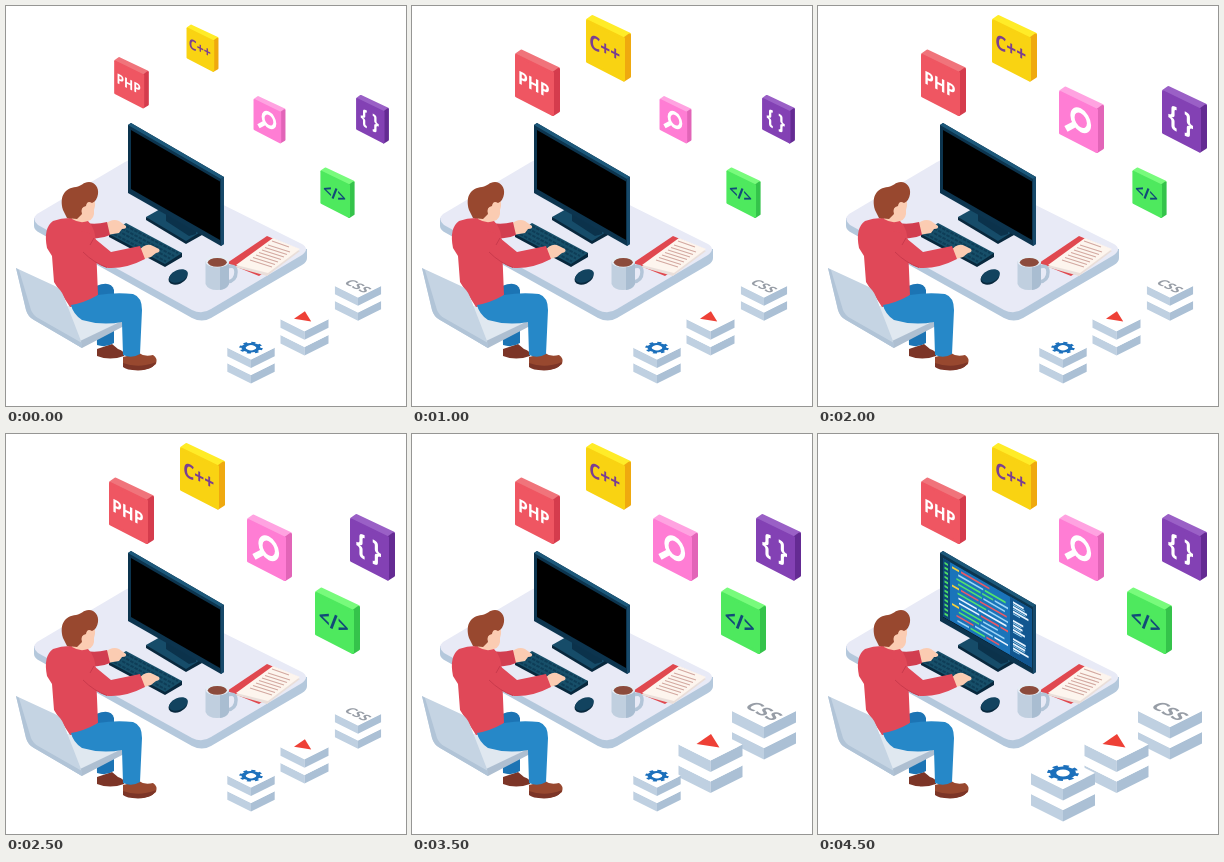
An HTML page that plays this animation: 400 px wide and 400 px high, repeating every 5 s.

```html
<!DOCTYPE html>
<html lang="en">
<head>
<meta charset="utf-8">
<title>Programmer at a desk</title>
<style>
  html, body { margin: 0; width: 100%; height: 100%; overflow: hidden; background: #fff; }
  svg { display: block; width: 100%; height: 100%; }
  text { font-family: "Open Sans", sans-serif; font-weight: 700; text-anchor: middle; }
</style>
</head>
<body>
<svg viewBox="0 0 400 400">
  <g id="desk">
    <path fill="#b4c8dc" d="M28 212V220Q28 224 34 227L186 312Q196 317 205 312L296 259Q301 256 301 252V243Z"/>
    <path fill="#e8eaf6" d="M31 208L119 156Q125 152 131 156L296 238Q304 243 296 249L205 303Q196 309 186 304L32 219Q25 213 31 208Z"/>
  </g>

  <g id="monitor">
    <path fill="#08283d" d="M140 211V214L180 238L196 229V225Z"/>
    <path fill="#164c69" d="M140 211L156 202L196 225L180 235Z"/>
    <path fill="#0b324b" d="M160 200L190 217V228L183 230L160 215Z"/>
    <path fill="#0c344e" d="M122 119L125 117L218 171V238L215 240L122 187Z"/>
    <path fill="#1c587a" d="M122 119L125 117L218 171L215 173Z"/>
    <path fill="#17496a" d="M215 173L218 171V238L215 240Z"/>
    <path fill="#000" d="M125 124L214 175.500V234L125 183Z"/>
    <g id="screen" transform="matrix(1 .575 0 1 125 124)"></g>
  </g>

  <g id="items">
    <path fill="#08283d" d="M103 228V231L159 261L176 251V247Z"/>
    <path fill="#174f69" d="M103 228L120 217L176 247L159 258Z"/>
    <g stroke="#0e3d57" stroke-width="2" stroke-dasharray="3.500 1.200">
      <path d="M108 228L160 255.500M112 225L164 252.500M116 222.500L168 250M120 220L172 247"/>
    </g>
    <ellipse cx="172" cy="271.500" rx="10" ry="6.500" fill="#08283d" transform="rotate(-24 172 271.500)"/>
    <ellipse cx="172.500" cy="270" rx="10" ry="6" fill="#12435f" transform="rotate(-24 172.500 270)"/>

    <path fill="#e0484f" d="M221 257L261 230L292 243L253 270Z"/>
    <path fill="#eadfda" d="M229 261L266 234L294 245L261 270Z"/>
    <path fill="#fdf5ee" d="M230 259L267 232L294 243L262 267Z"/>
    <path fill="none" stroke="#d3a9a1" stroke-width="1.200" d="M266 235L283 241M262 239L284 246M259 241.500L281 248.500M256 244L278 251M253 246.500L275 253.500M250 249L272 256M247 251.500L269 258.500M244 254L266 261"/>

    <path fill="none" stroke="#b3c5d8" stroke-width="3.500" d="M221 261Q230 258 230 266Q230 275 221 276"/>
    <path fill="#c0cfdf" d="M199.500 255V278Q202 284 211 284Q221 284 223 278V255Z"/>
    <path fill="#a9bdd1" d="M214 259L223 255V278Q221 283 214 284Z"/>
    <ellipse cx="211.300" cy="255.500" rx="11.800" ry="6" fill="#e6edf5"/>
    <ellipse cx="211.300" cy="256.300" rx="9.500" ry="4.400" fill="#8c4b3c"/>
  </g>

  <g id="man">
    <path fill="#fbccb2" d="M98 219Q106 212 113 215L120 220Q121 223 116 223L113 227L101 229Z"/>
    <path fill="#d23e50" d="M80 217Q90 219 101 216L104 229Q94 234 82 231Z"/>
    <path fill="#7c3527" d="M91 343V350Q104 355 118 350Q119 345 112 343L106 338Z"/>
    <path fill="#1c74b4" d="M90 280Q105 274 108 284V337Q100 342 91 339Z"/>
    <path fill="#98482f" d="M117 351L133 347Q138 351 147 349Q152 352 150 358Q144 364 132 364Q121 363 117 360Z"/>
    <path fill="#7c3527" d="M117 357Q133 363 150 356Q147 364 132 364.500Q120 364 117 361Z"/>
    <path fill="#aebfd1" d="M60 324L74 334L118 313V320L76 342L66 336Z"/>
    <path fill="#e0e8f0" d="M56 302L90 290L118 306V314L74 335Z"/>
    <path fill="#e04858" d="M47 215Q63 209 82 215Q90 222 90 240L92 289Q81 300 64 301L48 276L46 250L41 242Q37 222 47 215Z"/>
    <path fill="#2688c8" d="M65 299Q78 297 92 289Q110 286 127 288Q136 291 136 304L134 348Q126 353 117 349L116 316Q96 320 76 314Q67 308 65 299Z"/>
    <path fill="#c5d4e3" d="M10 262L49 280Q55 283 58 291L75 335L76 342L28 314Q22 311 20 304Z"/>
    <path fill="#b1c4d7" d="M10 262L13 264L25 304Q27 309 32 312L76 337V342L28 314Q22 311 20 304Z"/>
    <path fill="#fbccb2" d="M132 246Q139 236 147 240L153 243Q155 246 150 247L145 251L135 254Z"/>
    <path fill="#e04858" d="M72 226Q82 223 88 232L105 246L134 240L139 253Q120 263 102 262Q91 259 77 246Z"/>
    <path fill="none" stroke="#c93a4c" d="M77 246Q88 257 101 261.500M88 232L84 239"/>
    <path fill="#fbccb2" d="M67 201L86 191Q91 196 88 204Q89 213 82 215Q74 218 66 213Z"/>
    <path fill="#98482f" d="M57 204C53 190 59 182 70 181C76 180 77 176 83 176C89 176 93 182 92 188Q91 195 86 197Q81 194 80 200Q74 201 76 208L71 213L61 212Z"/>
  </g>

  <g id="badges"></g>
</svg>

<script>
const STEP = 500, LOOP = 5000;
const $ = id => document.getElementById(id);

const label = (str, size, fill, x, y) =>
  `<text x="${x}" y="${y}" font-size="${size}" fill="${fill}">${str}</text>`;

// Upright tile; its icon is drawn on the sheared front face.
const tile = (front, top, side, icon) => `
  <g stroke-width="3" stroke-linejoin="round">
    <path fill="${top}" stroke="${top}" d="M-21-28L-16-31.500L21-14L16-10Z"/>
    <path fill="${side}" stroke="${side}" d="M15.500-9L21-13V28.500L15.500 32Z"/>
    <path fill="${front}" stroke="${front}" d="M-21-27L15-9.500V32L-21 13.500Z"/>
  </g>
  <g transform="matrix(.87 .43 0 1 -22.500 -29)">${icon}</g>`;

const slab = y => `
  <g transform="translate(0 ${y})">
    <path fill="#bfd0e1" d="M-32 0L0 16V27.500L-32 11.500Z"/>
    <path fill="#abc0d5" d="M32 0L0 16V27.500L32 11.500Z"/>
    <path fill="#fff" d="M0-16L32 0L0 16L-32 0Z"/>
  </g>`;

// Two stacked slabs with an icon lying on the top.
const stack = icon => slab(10.5) + slab(-10.5) +
  `<g transform="matrix(.87 .435 -.87 .435 0 -10.500)">${icon}</g>`;

const lens = `<g fill="none" stroke="#fff" stroke-width="4.800">
  <circle cx="25" cy="19" r="9.500"/><path stroke-width="5.500" d="M18 26L8 35"/></g>`;
const gear = `<g fill="none" stroke="#1c70bc">
  <circle r="8" stroke-width="5"/>
  <circle r="11" stroke-width="3.800" stroke-dasharray="4.320"/></g>`;
const flag = `<path fill="#ee4036" d="M-8.600 7.500L-11.800-12.400L8.600-1.700Z"/>`;

// x, y, resting scale, artwork: listed in the order they grow
const badges = [
  [125.5, 76.5, .77, tile("#ef5662", "#f0747b", "#d53c4d", label("PHP", 18, "#fff", 21.5, 28))],
  [196.5, 42, .71, tile("#f9d312", "#ffec28", "#efa90f", label("C++", 20, "#7a3e92", 21.5, 27))],
  [263.5, 113.5, .71, tile("#ff7dd4", "#ffa3e1", "#e265b8", lens)],
  [366.5, 113, .73, tile("#8341b4", "#9a60c6", "#642b93", label("{ }", 28, "#fff", 21.5, 30))],
  [331.5, 186.5, .76, tile("#4ee95e", "#78fb7c", "#35c34b", label("&lt;/&gt;", 22, "#124a78", 21.5, 29))],
  [352, 287.5, .72, stack(label("CSS", 19, "#979da6", 0, 7))],
  [298.5, 321, .75, stack(flag)],
  [245, 349.5, .74, stack(gear)]
];

function codeView() {
  let seed = 7;
  const rnd = () => (seed = seed * 16807 % 2147483647) / 2147483647;
  const bar = (x, y, w, h, c) => `<rect x="${x}" y="${y}" width="${w}" height="${h}" fill="${c}"/>`;
  const inks = ["#e8f4ff", "#ef5962", "#55e36b", "#9ed5f5"];
  let out = bar(0, 0, 89, 58.5, "#1a74ba") + bar(0, 0, 7, 58.5, "#0d4775") +
    bar(67, 0, 22, 58.5, "#115690");
  for (let i = 0; i < 12; i++) {
    const y = 3 + i * 4.6;
    out += bar(1.5, y, 3.5, 2.2, "#4edc64");
    let x = 9;
    if (i % 4 == 0) out += bar(x, y, 7, 2, "#f4d13d");
    x += i % 4 ? 3 + rnd() * 6 : 9;
    const end = 45 + rnd() * 19;
    while (x < end) {
      const w = Math.min(10 + rnd() * 20, 65 - x);
      out += bar(x, y, w, 1.8, inks[rnd() * 4 | 0]);
      x += w + 1.5;
    }
    if (i % 4 != 3) out += bar(70, y, 9 + rnd() * 8, 2, "#e8f4ff") +
      bar(70, y + 2.7, 6 + rnd() * 8, 1, "#9ed5f5");
  }
  return out;
}

$("screen").innerHTML = codeView();
$("badges").innerHTML = badges.map(b => `<g>${b[3]}</g>`).join("");
const nodes = [...$("badges").children];

function draw(t) {
  const n = Math.floor(t % LOOP / STEP);
  badges.forEach(([x, y, rest], i) =>
    nodes[i].setAttribute("transform", `translate(${x} ${y}) scale(${n > i ? 1 : rest})`));
  $("screen").setAttribute("visibility", n == 9 ? "visible" : "hidden");
}

const start = performance.now();
function tick() {
  draw(performance.now() - start);
  requestAnimationFrame(tick);
}
tick();
</script>
</body>
</html>
```
